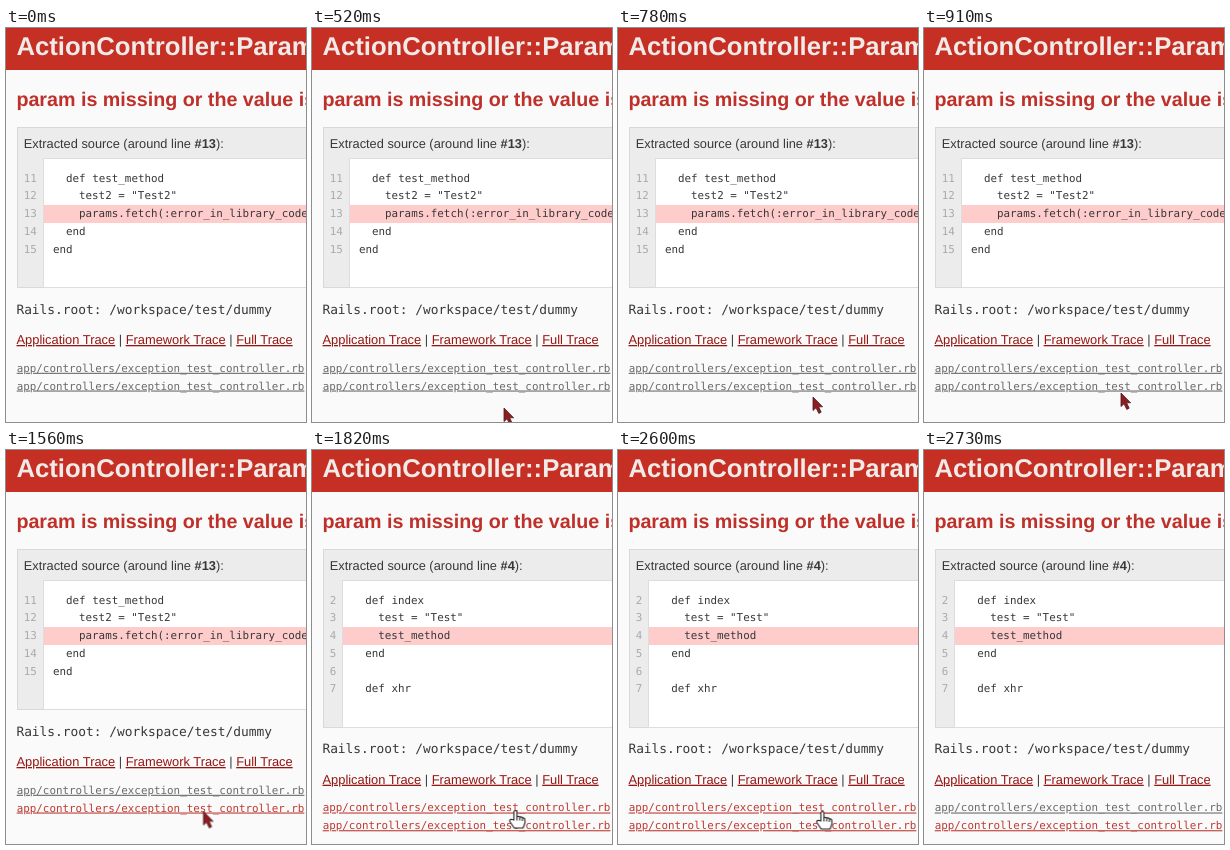
An HTML page for the animation above (3510 ms loop, 300 by 394 pixels).

```html
<!DOCTYPE html>
<html lang="en">
<head>
<meta charset="utf-8">
<title>Error page</title>
<style>
  html, body { margin: 0; width: 100%; height: 100%; overflow: hidden; background: #fafafa; }
  svg { display: block; }
  text {
    font: 12.8px "Liberation Sans", Arial, sans-serif;
    fill: #383838;
    text-rendering: geometricPrecision;
    text-decoration-skip-ink: none;
  }
  .title { font-size: 25.7px; font-weight: bold; fill: #f0ebe8; }
  .message { font-size: 19.7px; font-weight: bold; fill: #be3029; }
  .strong { font-weight: bold; }
  .code text, .mono { font-family: "DejaVu Sans Mono", monospace; }
  .code text, .frame { font-size: 10.87px; }
  .code .nums text { fill: #aaa; }
  .foot .wide { font-size: 12.86px; }
  .link { fill: #951511; text-decoration: underline; }
  .frame { fill: #6a6a6a; text-decoration: underline; }
  .box { fill: #ececec; stroke: #d9d9d9; }
  .paper { fill: #fff; stroke: #ddd; }
  .active { fill: #fcc; }

  .first, .second, .foot, .lower, .upper, .arrow, .hand {
    animation: 3510ms step-end infinite;
  }
  .first { animation-name: first; }
  .second { animation-name: second; }
  .foot { animation-name: foot; }
  .upper { animation-name: upper; }
  .lower { animation-name: lower; }
  .arrow { animation-name: arrow; }
  .hand { animation-name: hand; }

  @keyframes first { 0% { visibility: visible; } 51.85%, 100% { visibility: hidden; } }
  @keyframes second { 0% { visibility: hidden; } 51.85%, 100% { visibility: visible; } }
  @keyframes foot {
    0% { transform: translate(0, 0); }
    51.85%, 100% { transform: translate(0, 17.7px); }
  }
  @keyframes upper { 0%, 77.77%, 100% { fill: #6a6a6a; } 51.85% { fill: #bd3a32; } }
  @keyframes lower { 0% { fill: #6a6a6a; } 29.62%, 100% { fill: #bd3a32; } }
  @keyframes arrow {
    0% { visibility: hidden; transform: translate(189px, 394px); }
    11.11% { visibility: visible; transform: translate(190px, 389px); }
    14.81% { visibility: visible; transform: translate(192px, 380px); }
    18.51% { visibility: visible; transform: translate(194px, 373px); }
    22.22% { visibility: visible; transform: translate(195px, 369px); }
    25.92% { visibility: visible; transform: translate(197px, 365px); }
    29.62% { visibility: hidden; transform: translate(197.5px, 361.5px); }
    44.44% { visibility: visible; transform: translate(197.5px, 361.5px); }
    51.85%, 100% { visibility: hidden; transform: translate(197.5px, 361.5px); }
  }
  @keyframes hand {
    0% { visibility: hidden; transform: translate(203.4px, 360px); }
    29.62% { visibility: visible; transform: translate(203.4px, 360px); }
    44.44% { visibility: hidden; transform: translate(203.4px, 360px); }
    51.85% { visibility: visible; transform: translate(203.4px, 360px); }
    74.07% { visibility: visible; transform: translate(204.4px, 361px); }
    77.77%, 100% { visibility: hidden; transform: translate(204.4px, 361px); }
  }
</style>
</head>
<body>
<svg width="300" height="394" viewBox="0 0 300 394">
  <rect width="300" height="394" fill="#fafafa"/>
  <rect width="300" height="42" fill="#c52f24"/>
  <text class="title" x="10.4" y="27">ActionController::Parameter</text>
  <text class="message" x="10.4" y="77.5">param is missing or the value is</text>

  <g class="first code">
    <rect class="box" x="11.5" y="99.5" width="300" height="160"/>
    <rect class="paper" x="37.5" y="130.5" width="300" height="129"/>
    <rect class="active" x="38" y="177" width="262" height="18"/>
    <g class="nums">
      <text x="17.8" y="153.6">11</text>
      <text x="17.8" y="171.3">12</text>
      <text x="17.8" y="189">13</text>
      <text x="17.8" y="206.8">14</text>
      <text x="17.8" y="224.5">15</text>
    </g>
    <text x="60" y="153.6">def test_method</text>
    <text x="73" y="171.3">test2 = "Test2"</text>
    <text x="73" y="189">params.fetch(:error_in_library_code)</text>
    <text x="60" y="206.8">end</text>
    <text x="47" y="224.5">end</text>
  </g>

  <g class="second code">
    <rect class="box" x="11.5" y="99.5" width="300" height="178"/>
    <rect class="paper" x="30.5" y="130.5" width="300" height="147"/>
    <rect class="active" x="31" y="177" width="269" height="18"/>
    <g class="nums">
      <text x="17.8" y="153.6">2</text>
      <text x="17.8" y="171.3">3</text>
      <text x="17.8" y="189">4</text>
      <text x="17.8" y="206.8">5</text>
      <text x="17.8" y="224.5">6</text>
      <text x="17.8" y="242.3">7</text>
    </g>
    <text x="53.3" y="153.6">def index</text>
    <text x="66.3" y="171.3">test = "Test"</text>
    <text x="66.3" y="189">test_method</text>
    <text x="53.3" y="206.8">end</text>
    <text x="53.3" y="242.3">def xhr</text>
  </g>

  <text class="first" x="17.8" y="120">Extracted source (around line <tspan class="strong">#13</tspan>):</text>
  <text class="second" x="17.8" y="120">Extracted source (around line <tspan class="strong">#4</tspan>):</text>

  <g class="foot">
    <text class="mono wide" x="10.4" y="285.5">Rails.root: /workspace/test/dummy</text>
    <text class="wide" x="10.5" y="316"><tspan class="link">Application Trace</tspan> | <tspan class="link">Framework Trace</tspan> | <tspan class="link">Full Trace</tspan></text>
    <text class="mono frame upper" x="10.7" y="343.8">app/controllers/exception_test_controller.rb</text>
    <text class="mono frame lower" x="10.7" y="361.5">app/controllers/exception_test_controller.rb</text>
  </g>

  <path class="arrow" d="M0 0V13.5L3 10.8L5.8 16.4L8.2 15.2L5.6 9.8H9.6Z"
        fill="#8f1c20" stroke="#4a2022" stroke-width=".8" stroke-linejoin="round"/>
  <path class="hand" d="M-1.5 10V1.5Q0 -.5 1.5 1.5V7Q3 5.5 4.3 7.2Q6 6.2 7 8Q9.5 7.5 9.5 10V13L7.7 18H-1.2L-5.6 11.5Q-6 9 -3.5 9.5Z
        M1.5 7V10.5M4.3 7.5V10.5M7 8.2V11" fill="#fff" stroke="#222" stroke-width="1.1" stroke-linejoin="round"/>
</svg>
</body>
</html>
```
